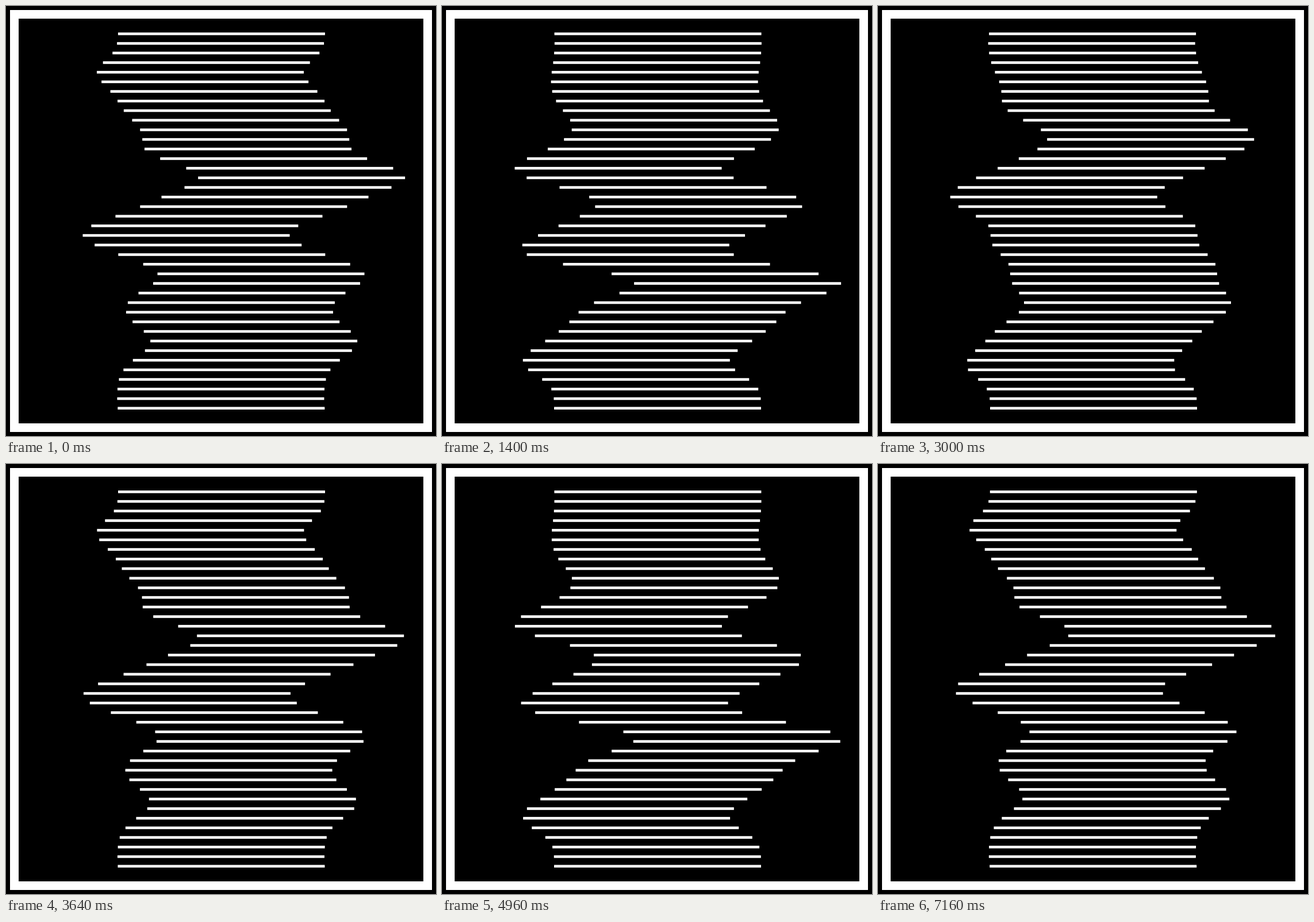
These frames come from a looping animation (748 px wide and 748 px high, 7.2 s). An HTML page with a canvas:

```html
<!DOCTYPE html>
<html lang="en">
<head>
<meta charset="utf-8">
<title>Drifting lines</title>
<style>
  html, body { margin: 0; width: 100%; height: 100%; overflow: hidden; background: #000; }
  canvas { display: block; }
</style>
</head>
<body>
<canvas width="748" height="748"></canvas>
<script>
const ctx = document.querySelector('canvas').getContext('2d');
const ROWS = 40, STEP_MS = 40, STEPS = 180;
const REST = 195, LENGTH = 360, THICK = 4.6;
const TOP = 46.1, GAP = 16.7;

const CYCLE = STEPS / 2; // the swells come round twice per loop
const SPEED = 0.31;      // rows a swell sinks per step
const LIFE = 12;         // steps, and rows below: spread of one swell
const SPREAD = 1.5;

// Swells gather in three surges per cycle: [row, sideways push].
const surges = [
  { at: 0, swells: [[4, -36], [10.5, 40], [14.8, 128], [18, 36], [20.6, -65], [25.2, 75], [32, 52]] },
  { at: 34, swells: [[9.3, 34], [14, -78], [17.2, 78], [22.6, -70], [25.5, 145], [29, 28], [33.8, -55]] },
  { at: 63, swells: [[7.8, 78], [13.8, -85], [17.7, -58], [20.2, 58], [24.8, 64], [30.7, -68]] },
];

const bell = (x, width) => Math.exp(-x * x / (2 * width * width));
// Signed distance from one surge, the short way round the cycle.
const since = (step, at) => (step - at + 1.5 * CYCLE) % CYCLE - CYCLE / 2;
// Lines settle towards the top and bottom.
const taper = row => Math.min(1, (Math.min(row, ROWS - 1 - row) + 0.5) / 4);

function push(row, step) {
  let sum = 0;
  for (const { at, swells } of surges) {
    const age = since(step, at);
    for (const [home, size] of swells) {
      sum += size * bell(age, LIFE) * bell(row - home - SPEED * age, SPREAD);
    }
  }
  return sum * taper(row);
}

function draw(now) {
  const step = Math.floor(now / STEP_MS) % STEPS;
  ctx.fillStyle = '#000';
  ctx.fillRect(0, 0, 748, 748);
  ctx.strokeStyle = ctx.fillStyle = '#fff';
  ctx.lineWidth = 15;
  ctx.strokeRect(14.5, 14.5, 719, 719);
  for (let row = 0; row < ROWS; row++) {
    ctx.fillRect(REST + push(row, step), TOP + GAP * row, LENGTH, THICK);
  }
}

const begin = performance.now();
function tick() {
  draw(performance.now() - begin);
  requestAnimationFrame(tick);
}
tick();
</script>
</body>
</html>
```
